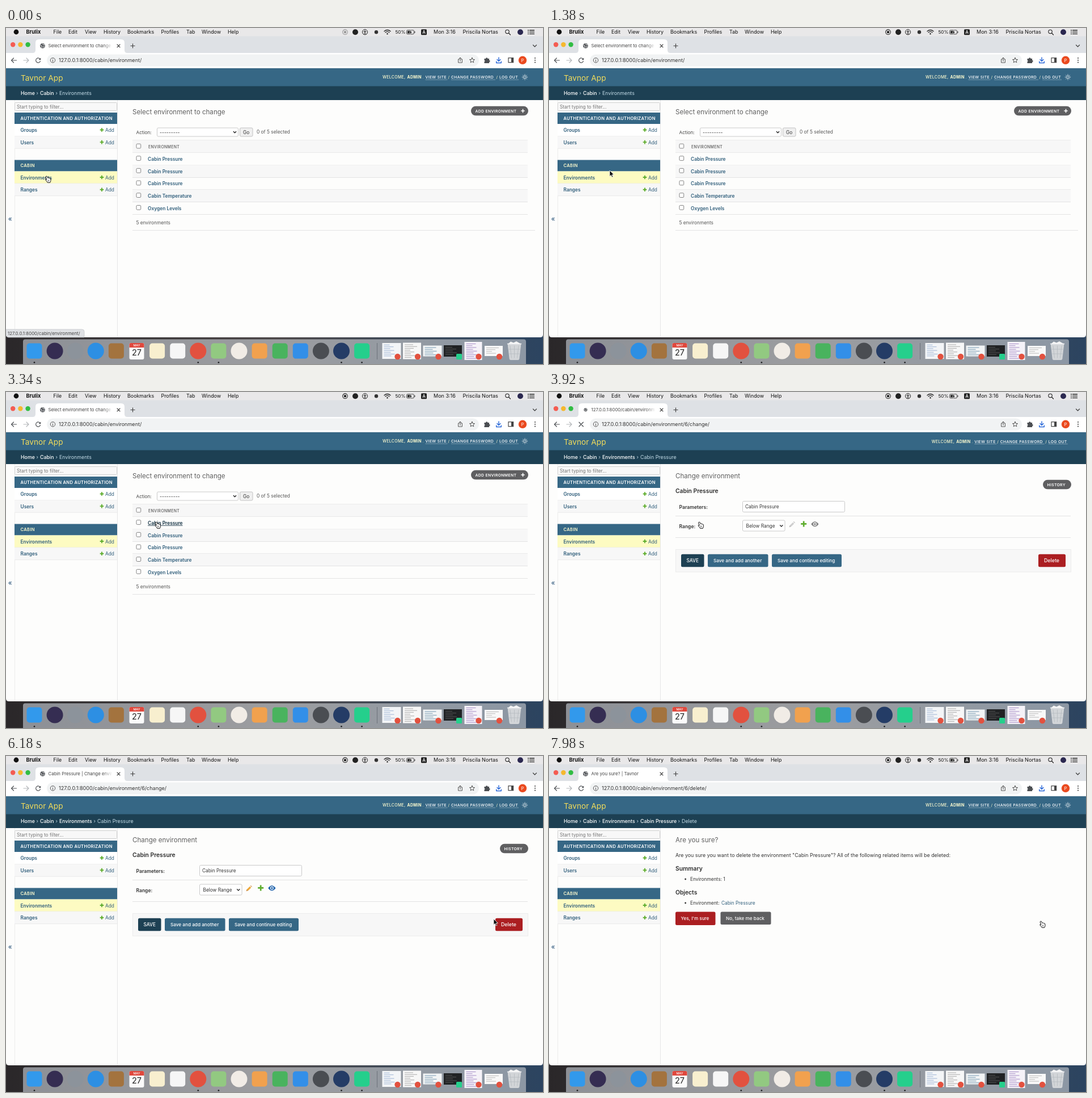
Animation, 947 px wide and 592 px high, one loop 8 s. Source, as an HTML page:

```html
<!DOCTYPE html>
<html lang="en">
<head>
<meta charset="utf-8">
<title>Admin session</title>
<style>
html, body { margin: 0; width: 100%; height: 100%; overflow: hidden; }
svg { display: block; width: 947px; height: 592px; font-family: Inter, "Open Sans", sans-serif; }
text { white-space: pre; }
</style>
</head>
<body>
<svg id="stage" viewBox="0 0 947 592"></svg>
<script>
const LOOP = 8000;
const BLUE = '#366785', NAVY = '#1d4053', LINK = '#315f7c', INK = '#333', GRAY = '#5f5f61', RED = '#ab1e21';

// Drawing helpers that return SVG markup
const attrs = o => Object.entries(o).map(([k, v]) => ` ${k}="${v}"`).join('');
const text = (x, y, s, size = 8.35, fill = INK, weight = 400, o = {}) =>
  `<text${attrs({ x, y, 'font-size': size, fill, 'font-weight': weight, ...o })}>${s}</text>`;
const caps = (x, y, s, size, fill, weight) => text(x, y, s, size, fill, weight, { 'letter-spacing': .33 });
const rect = (x, y, width, height, fill, o = {}) => `<rect${attrs({ x, y, width, height, fill, ...o })}/>`;
const circle = (cx, cy, r, fill, o = {}) => `<circle${attrs({ cx, cy, r, fill, ...o })}/>`;
const line = (d, stroke = '#555', w = 1.2, o = {}) =>
  `<path${attrs({ d, stroke, 'stroke-width': w, fill: 'none', 'stroke-linecap': 'round', 'stroke-linejoin': 'round', ...o })}/>`;
const shape = (d, fill, o = {}) => `<path${attrs({ d, fill, ...o })}/>`;
const group = (id, body) => `<g id="${id}">${body}</g>`;
const plus = (x, y, r, color, w) => line(`M${x - r} ${y}h${2 * r}M${x} ${y - r}v${2 * r}`, color, w, { 'stroke-linecap': 'butt' });
const rule = (x1, x2, y, color = '#e3e3e3') => rect(x1, y, x2 - x1, 1, color);
const box = (x, y, w, h, r = 2, fill = '#fff', stroke = '#c4c4c4') =>
  rect(x + .5, y + .5, w - 1, h - 1, fill, { rx: r, stroke, 'stroke-width': .9 });
const button = (x, y, w, h, s, fill, size = 8.3, tx = 10) =>
  rect(x, y, w, h, fill, { rx: 2.5 }) + text(x + tx, y + h / 2 + 3.1, s, size, '#fff', 500);

function menuBar() {
  const items = [[83.5, 'File'], [110, 'Edit'], [139, 'View'], [172, 'History'], [214, 'Bookmarks'],
    [273.5, 'Profiles'], [318, 'Tab'], [345, 'Window'], [391, 'Help']];
  return rect(0, 0, 947, 15, '#e9e8e9') +
    circle(18, 7, 4.4, '#111') +
    text(35.5, 10.3, 'Brulix', 9.2, '#111', 700) +
    items.map(([x, s]) => text(x, 10.3, s, 8.9, '#111')).join('') +
    group('record', circle(598, 7.2, 4.3, 'none', { stroke: '#222', 'stroke-width': 1.1 }) + rect(596, 5.2, 4, 4, '#222', { rx: .8 })) +
    circle(616, 7.2, 5, '#222') +
    circle(633, 7.2, 4.6, 'none', { stroke: '#222' }) + circle(633, 4.9, .9, '#222') +
    line('M630.6 6.6h4.8M633 6.6v2l-1.5 2.2M633 8.6l1.5 2.2', '#222', .9) +
    circle(653, 7.2, 3.2, '#333') +
    line('M667 5.8q5.5-4.6 11 0M668.9 7.9q3.6-3 7.2 0', '#222', 1.3) + circle(672.5, 10.2, 1.2, '#222') +
    text(686.5, 10.2, '50%', 8.2, '#111') +
    rect(706.5, 3.8, 13, 7, 'none', { rx: 1.8, stroke: '#333', 'stroke-width': .9 }) + rect(708, 5.2, 6, 4.2, '#222') +
    shape('M714 3l-3 5h2.3l-.9 4 3.7-5.4h-2.4z', '#111', { stroke: '#e9e8e9', 'stroke-width': .5 }) + rect(720.5, 5.8, 1, 3, '#333') +
    rect(732, 2.2, 10, 10, '#222', { rx: 1.5 }) + text(737, 10.2, 'A', 8, '#fff', 500, { 'text-anchor': 'middle' }) +
    text(754, 10.3, 'Mon 3:16', 9, '#111') +
    text(805.5, 10.3, 'Priscila Nortas', 9.1, '#111') +
    circle(884, 6.4, 3.2, 'none', { stroke: '#222', 'stroke-width': 1.1 }) + line('M886.5 9l3 3', '#222') +
    circle(907, 7.2, 5, '#2b2850') +
    line('M920.5 4h1M923.5 4h8M920.5 7.2h1M923.5 7.2h8M920.5 10.4h1M923.5 10.4h8', '#222', 1.3);
}

function browserBar() {
  const lights = ['#f45c52', '#f5b82e', '#31bd43'].map((c, i) => circle(12.2 + 13.2 * i, 29.2, 4.2, c)).join('');
  return rect(0, 14.5, 947, 30, '#dee1e5') + lights +
    shape('M47 44q5 0 5-5V26q0-6 6-6h145q6 0 6 6v13q0 5 5 5z', '#fff') +
    rect(0, 44, 947, 27, '#fff') + rule(0, 947, 70, '#e2e4e7') +
    group('globe', circle(64.5, 31.3, 4.4, '#55585c') + line('M61.3 30.2l2.3 1.8-.6 2.3M64.4 28l2 1.6 1.7-.4M66 34l1-2', '#fff', 1)) +
    group('tabTitle', '') +
    rect(170, 23, 18, 17, 'url(#fade)') + rect(188, 23, 12, 17, '#fff') +
    line('M196 29l5 5M201 29l-5 5', '#444', 1.1) +
    plus(223.5, 31.5, 4, '#444', 1.2) + line('M929.5 30l3 3 3-3', '#444', 1.3) +
    line('M18.5 57h-9M13.5 53l-4 4 4 4', '#505357') + line('M31 57h9M36 53l4 4-4 4', '#b4b7ba') +
    group('reload', line('M60.4 55.2a4.1 4.1 0 1 0 .1 3.4', '#505357') + shape('M61.3 52.4v3.8h-3.8z', '#505357')) +
    group('stop', line('M53 53.3l7.4 7.4M60.4 53.3l-7.4 7.4', '#505357', 1.3)) +
    rect(72, 46.5, 762, 21, '#f1f3f4', { rx: 10.5 }) +
    circle(82.5, 56.8, 4.2, 'none', { stroke: '#555', 'stroke-width': 1 }) + line('M82.5 56.6v2.3M82.5 54.5v.1', '#555', 1.1) +
    group('url', '') +
    line('M799.4 55h-1.8v6h6.8v-6h-1.8M801 58.5v-6M799 54l2-2 2 2', '#555', 1) +
    line('M822 52.3l1.3 3 3.2.3-2.4 2.1.7 3.2-2.8-1.7-2.8 1.7.7-3.2-2.4-2.1 3.2-.3z', '#555', 1) +
    shape('M843.5 54h2.6a1.7 1.7 0 0 1 3.4 0h2.6v2.7a1.6 1.6 0 0 1 0 3.2v2h-8.6v-2.4a1.5 1.5 0 0 0 0-2.8z', '#4b4e52') +
    line('M869 52v6M866 55.5l3 3 3-3M864.7 59v2.5h8.6V59', '#2867d8', 1.4) +
    rect(886, 52.7, 8.6, 8, 'none', { stroke: '#444', 'stroke-width': 1.2 }) + rect(891, 53, 3.6, 7.4, '#444') +
    circle(911, 56.8, 7.2, '#ea4a1f') + text(911, 59.5, 'P', 7.6, '#fff', 400, { 'text-anchor': 'middle' }) +
    [53, 56.8, 60.6].map(y => circle(933, y, 1.05, '#444')).join('');
}

function header() {
  const tools = [[739.5, 'VIEW SITE', 39], [785, 'CHANGE PASSWORD', 78], [870, 'LOG OUT', 34]];
  return rect(0, 71, 947, 32, BLUE) + rect(0, 102.5, 947, 24.5, NAVY) +
    text(26, 92.5, 'Tavnor App', 13.7, '#f2dc5a') +
    group('tools', caps(664, 89, 'WELCOME,', 6.95, '#fcfbd0', 500) + caps(707.5, 89, 'ADMIN', 6.9, '#fcfbd0', 700) +
      caps(734.5, 89, '.', 6.9, '#fcfbd0') +
      tools.map(([x, s, w]) => caps(x, 89, s, 6.85, '#fff', 500) + rule(x, x + w, 90.6, '#7d9eb2')).join('') +
      caps(779.5, 89, '/', 6.9, '#fcfbd0') + caps(864.5, 89, '/', 6.9, '#fcfbd0')) +
    group('sun', circle(915, 86.5, 2.2, 'none', { stroke: '#fff', 'stroke-width': .9 }) +
      [0, 45, 90, 135, 180, 225, 270, 315].map(a => line('M915 82.8v-1', '#fff', .9, { transform: `rotate(${a} 915 86.5)` })).join(''));
}

function sidebar() {
  const caption = (y, s) => rect(15, y, 181, 20, BLUE) + caps(25.5, y + 12.8, s, 7.6, '#fff', 600);
  const row = (y, s, bg) => rect(15, y, 181, 21.7, bg) + rule(15, 196, y + 21, '#eaeaea') +
    text(25.5, y + 14, s, 8.4, LINK, 600) + plus(169, y + 10.5, 3.3, '#5fad2e', 1.9) + text(175, y + 14, 'Add', 8.3, LINK);
  return rect(15, 127, 1, 418, '#ececec') + rect(196, 127, 1, 418, '#e6e6e6') +
    box(15, 131, 181, 15, 1, '#f8f8f8', '#ccc') + text(19, 141.5, 'Start typing to filter...', 8.3, '#757575') +
    caption(149, 'AUTHENTICATION AND AUTHORIZATION') + row(169, 'Groups', '#fff') + row(190.6, 'Users', '#f7f7f7') +
    caption(232.5, 'CABIN').replace('#fff', '#fdfbcf') + row(252.5, 'Environments', '#fdfbc2') + row(274.2, 'Ranges', '#f7f7f7') +
    text(3.8, 340, '«', 11.5, '#3d6486', 500);
}

const title = s => text(223, 152.2, s, 11.6, '#606060');
const heading = (y, s) => text(223, y, s, 10.3, '#2d2d2d', 600);
const pill = (x, y, w, s) => rect(x, y, w, 16.5, GRAY, { rx: 8.25 }) + caps(x + 7.5, y + 10.8, s, 6.85, '#fff', 600);
const chevron = (x, y) => line(`M${x - 2.2} ${y - 1}l2.2 2.3 2.2-2.3`, '#222', 1.3);

function listPage() {
  const names = ['Cabin Pressure', 'Cabin Pressure', 'Cabin Pressure', 'Cabin Temperature', 'Oxygen Levels'];
  const check = y => box(229.5, y - 4.3, 8.7, 8.7, 1.5, '#fff', '#777');
  return title('Select environment to change') + pill(820, 137.8, 101, 'ADD ENVIRONMENT') + plus(911.5, 146, 3.2, '#fff', 1.7) +
    text(229.5, 186.8, 'Action:', 8.2, '#444') + box(266, 175.5, 144, 16) + text(271, 186.8, '---------', 8.6) + chevron(403.5, 183.5) +
    box(412, 175.5, 23.5, 16, 2, '#f0f0f0', '#bbb') + text(418, 186.8, 'Go', 8.3) + text(442, 186.3, '0 of 5 selected', 8.35, '#555') +
    rect(223, 197.5, 697, 22, '#f7f7f7') + rule(223, 920, 197, '#ececec') + rule(223, 920, 219, '#e9e9e9') +
    check(208) + caps(251, 211.8, 'ENVIRONMENT', 6.95, '#5a5a5a', 500) +
    names.map((s, i) => {
      const y = 219.6 + 21.7 * i;
      return (i % 2 ? rect(223, y, 697, 21.7, '#f7f7f7') : '') + rule(223, 920, Math.round(y + 21.2), '#e4e4e4') +
        check(229.5 + 21.7 * i) + (i ? text(250, y + 14.2, s, 8.4, LINK, 600) : '');
    }).join('') +
    group('link', text(250, 233.8, names[0], 8.4, LINK, 600)) +
    group('hover', text(250, 233.8, names[0], 8.4, '#123042', 600, { 'text-decoration': 'underline' })) +
    text(229.5, 346, '5 environments', 8.3, '#555') + rule(223, 933, 356, '#e4e4e4');
}

function icons(pencil, nib, eye) {
  return line('M425.6 236.4l5.6-5.6', pencil, 3.2, { 'stroke-linecap': 'butt' }) + shape('M423.5 238.3l1-3.2 2.2 2.2z', nib) +
    line('M432 229.9l.8-.8', nib, 3.2, { 'stroke-linecap': 'butt' }) +
    shape('M462.2 232.7q6.6-9 13.4 0q-6.8 9-13.4 0z', eye) + circle(468.9, 232.7, 2.9, '#fff') + circle(468.9, 232.7, 1.8, eye);
}

function editPage() {
  return title('Change environment') + pill(871, 154.8, 50, 'HISTORY') + heading(178, 'Cabin Pressure') +
    text(229.5, 206, 'Parameters:', 8.6, INK, 600) + box(341, 192, 181, 20) + text(346, 205.3, 'Cabin Pressure', 8.3) +
    rule(223, 920, 218) + text(229.5, 239.8, 'Range:', 8.5, INK, 600) +
    box(341, 225.5, 75.5, 20) + text(347.5, 238.9, 'Below Range', 8.3) + chevron(409.8, 235.8) +
    plus(449.2, 232.4, 5, '#5fad2e', 2.7) + rule(223, 920, 256) +
    group('iconsOff', icons('#cfcfcf', '#b9b9b9', '#858585')) + group('iconsOn', icons('#eda83a', '#c98a45', '#2466ad')) +
    rect(223.5, 277.5, 697, 39.5, '#f7f7f7', { stroke: '#ececec' }) +
    button(233, 285.7, 40.5, 22.6, 'SAVE', NAVY, 8.3, 9.5) + button(280, 285.7, 106.5, 22.6, 'Save and add another', BLUE, 8.2) +
    button(393, 285.7, 123, 22.6, 'Save and continue editing', BLUE, 8.2) + button(863, 285.7, 48, 22.6, 'Delete', RED, 8.8);
}

function deletePage() {
  const bullet = y => circle(240.6, y, 1.4, '#333');
  return title('Are you sure?') +
    text(223, 178.2, 'Are you sure you want to delete the environment "Cabin Pressure"? All of the following related items will be deleted:', 8.88) +
    heading(202, 'Summary') + bullet(217) + text(249, 220, 'Environments: 1') +
    heading(244, 'Objects') + bullet(259) + text(249, 262, 'Environment: ') + text(304, 262, 'Cabin Pressure', 8.3, LINK) +
    button(223, 274.5, 70.5, 23.5, "Yes, I'm sure", RED, 8.15, 9.5) + button(302.5, 274.5, 89, 22.5, 'No, take me back', GRAY, 8.2, 9.5);
}

function dock() {
  const apps = [['#3299ec', 0], ['#352d52', 1], ['#8c939b', 1], ['#2d8fe3', 1], ['#a3733e', 0], null, ['#f8efcf', 0], ['#f6f6f6', 0],
    ['#e2513f', 1], ['#92c981', 0], ['#f1ece6', 1], ['#f1a14e', 0], ['#49b35e', 0], ['#338fe8', 0], ['#4a4d52', 1], ['#243c66', 1], ['#25cf8c', 0]];
  const tile = (a, i) => {
    const x = 50 + 36.1 * i;
    if (a) return a[1] ? circle(x, 569, 14.5, a[0]) : rect(x - 13.5, 555.5, 27, 27, a[0], { rx: 5 });
    return rect(x - 13, 555, 26, 29, '#fbfbfb', { rx: 3 }) + shape(`M${x - 13} 563v-5q0-3 3-3h20q3 0 3 3v5z`, '#e0483d') +
      text(x, 561.3, 'MAY', 5.4, '#fff', 500, { 'text-anchor': 'middle' }) + text(x, 577, '27', 14.5, '#222', 400, { 'text-anchor': 'middle' });
  };
  // Minimised windows: width, height, paper colour, line colour
  const thumbs = [[33, 28, '#f3f5f7', '#9db4d4'], [32, 29, '#f7f7f7', '#aaa'], [33, 19, '#f2f4f5', '#7598b0'],
    [32, 20, '#202224', '#555'], [31, 32, '#f5f2f8', '#a58cc6'], [32, 18, '#f8f8f8', '#bbb']];
  const thumb = ([w, h, bg, ink], i) => {
    const x = 680 + 36 * i - w / 2, y = 569 - h / 2;
    let s = rect(x, y, w, h, bg);
    for (let k = 0; k * 3.2 + 6 < h; k++) s += rect(x + 3, y + 3 + k * 3.2, 10 + (k * 7 + i * 5) % 13, 1, ink);
    return s + (i === 3 ? rect(x + w - 10, 574, 10, 10, '#25cf8c', { rx: 1.5 }) : circle(x + w - 6, 579, 5.2, '#e2513f'));
  };
  return rect(0, 530, 947, 62, 'url(#desk)') + rect(30, 548.5, 887, 50, 'url(#dockFill)', { rx: 4 }) +
    apps.map(tile).join('') + [0, 8, 9, 15, 16].map(i => circle(50 + 36.1 * i, 589.3, 1.3, '#17191b')).join('') +
    rect(654, 555, 1, 29, '#6d737b') + thumbs.map(thumb).join('') +
    shape('M884.5 556h24l-3.2 27q-.4 2-2.4 2h-12.8q-2 0-2.4-2z', '#d9dcde', { opacity: .9 }) +
    shape('M886 556l4-3.5 5 2 5-2.5 7 4z', '#f4f4f4') +
    line('M889 560l2.5 21M896.5 560v21M904 560l-2.5 21M887 566h19M888 574h17', '#b5babf', .8) +
    line('M884.5 556.5h24', '#f3f4f5', 1.4);
}

function pointers() {
  const hand = 'M-2.8-5.2q1.3-.9 2 .6l.9 2.4q1-.8 1.9.1q1-.5 1.6.5q1.3-.3 1.6 1.1l.3 2.6q0 1.5-.9 2.6l-.3 1.1h-4.6q-1.2-2.2-3.2-4.3q-.9-1.5.9-1.4l1 .6l-1.7-4.2q-.3-1.2.5-1.7z';
  return group('arrow', shape('M0 0v10.4l2.4-2.2 1.7 3.8 1.8-.8-1.7-3.7h3.3z', '#0b0b0b', { stroke: '#fff', 'stroke-width': .8 })) +
    group('hand', shape(hand, '#fff', { stroke: '#111', 'stroke-width': 1 }) + line('M.5 1.3v2.4M2.2 1.3v2.4', '#222', .6));
}

const gradient = (id, stops) => `<linearGradient id="${id}">` +
  stops.map(([at, c, a = 1]) => `<stop offset="${at}" stop-color="${c}" stop-opacity="${a}"/>`).join('') + '</linearGradient>';

document.getElementById('stage').innerHTML = '<defs>' +
  gradient('fade', [[0, '#fff', 0], [1, '#fff']]) +
  gradient('desk', [[0, '#2a2729'], [.5, '#4a4546'], [.85, '#34475c'], [1, '#2c4460']]) +
  gradient('dockFill', [[0, '#8d9096'], [.5, '#9c9da0'], [1, '#8c97a4']]) + '</defs>' +
  dock() + shape('M0 14h947v526q0 5-5 5H5q-5 0-5-5z', '#fdfdfc') + menuBar() + browserBar() + header() + group('crumbs', '') + sidebar() +
  group('list', listPage()) + group('edit', editPage()) + group('del', deletePage()) +
  group('status', shape('M0 531h134q4 0 4 4v10H4q-4-1-4-5z', '#dfe1e4', { stroke: '#c6c8cb', 'stroke-width': .8 }) +
    text(3, 541, '127.0.0.1:8000/cabin/environment/', 7.9, '#444')) + pointers();

const el = {};
document.querySelectorAll('#stage g[id]').forEach(g => el[g.id] = g);
const show = (id, on) => el[id].setAttribute('display', on ? 'inline' : 'none');

const trail = [[26, 'Home'], [60, 'Cabin'], [94, 'Environments'], [161, 'Cabin Pressure'], [234, 'Delete']];
const crumbs = n => trail.slice(0, n).map(([x, s], i) => {
  const last = i === n - 1;
  return (i ? text(x - 6.6, 118.2, '›', 8.9, '#c4dce8') : '') + text(x, 118.2, s, 8.85, last ? '#c4dce8' : '#fff', last ? 400 : 500);
}).join('');

const ROOT = '127.0.0.1:8000/cabin/environment/';
const views = [
  { at: 0, page: 'list', url: ROOT, tab: 'Select environment to change', depth: 3 },
  { at: 3860, page: 'edit', url: ROOT + '6/change/', tab: '127.0.0.1:8000/cabin/environm', depth: 4, loading: true },
  { at: 4020, page: 'edit', url: ROOT + '6/change/', tab: 'Cabin Pressure | Change envir', depth: 4 },
  { at: 6500, page: 'del', url: ROOT + '6/delete/', tab: 'Are you sure? | Tavnor', depth: 5 }
];
// Pointer moves: start, end, x, y
const moves = [[500, 1250, 107, 251], [1650, 2750, 267, 234.5], [4150, 5000, 573, 247], [5200, 6150, 860, 287], [6190, 6380, 869.5, 296.5]];
const ease = k => k * k * (3 - 2 * k);
let current;

function setView(v) {
  current = v;
  for (const p of ['list', 'edit', 'del']) show(p, p === v.page);
  el.tabTitle.innerHTML = text(74.5, 34.2, v.tab, 7.85, '#444');
  el.url.innerHTML = text(93, 60, v.url, 9.05, '#333');
  el.crumbs.innerHTML = crumbs(v.depth);
  const busy = !!v.loading;
  show('reload', !busy);
  show('stop', busy);
  show('sun', !busy);
  show('iconsOff', busy);
  show('iconsOn', !busy);
  el.tools.setAttribute('transform', `translate(${busy ? 10.7 : 0} ${busy ? .5 : 0})`);
  el.globe.setAttribute('transform', busy ? 'translate(19.4 9.4) scale(.7)' : '');
}

function draw(t) {
  const v = views.findLast(v => t >= v.at);
  if (v !== current) setView(v);
  let x = 73.5, y = 266.5;
  for (const [a, b, tx, ty] of moves) {
    const k = ease(Math.min(1, Math.max(0, (t - a) / (b - a))));
    x += (tx - x) * k;
    y += (ty - y) * k;
  }
  const onLink = t > 2500 && t < 3860;
  const hand = t < 750 || (t > 2500 && t < 4250) || t > 6240;
  show('hover', onLink);
  show('link', !onLink);
  show('hand', hand);
  show('arrow', !hand);
  el[hand ? 'hand' : 'arrow'].setAttribute('transform', `translate(${x.toFixed(2)} ${y.toFixed(2)})`);
  show('status', t < 800);
  el.record.setAttribute('opacity', t < 400 ? .4 : 1);
}

function tick() {
  draw(performance.now() % LOOP);
  requestAnimationFrame(tick);
}
tick();
</script>
</body>
</html>
```
